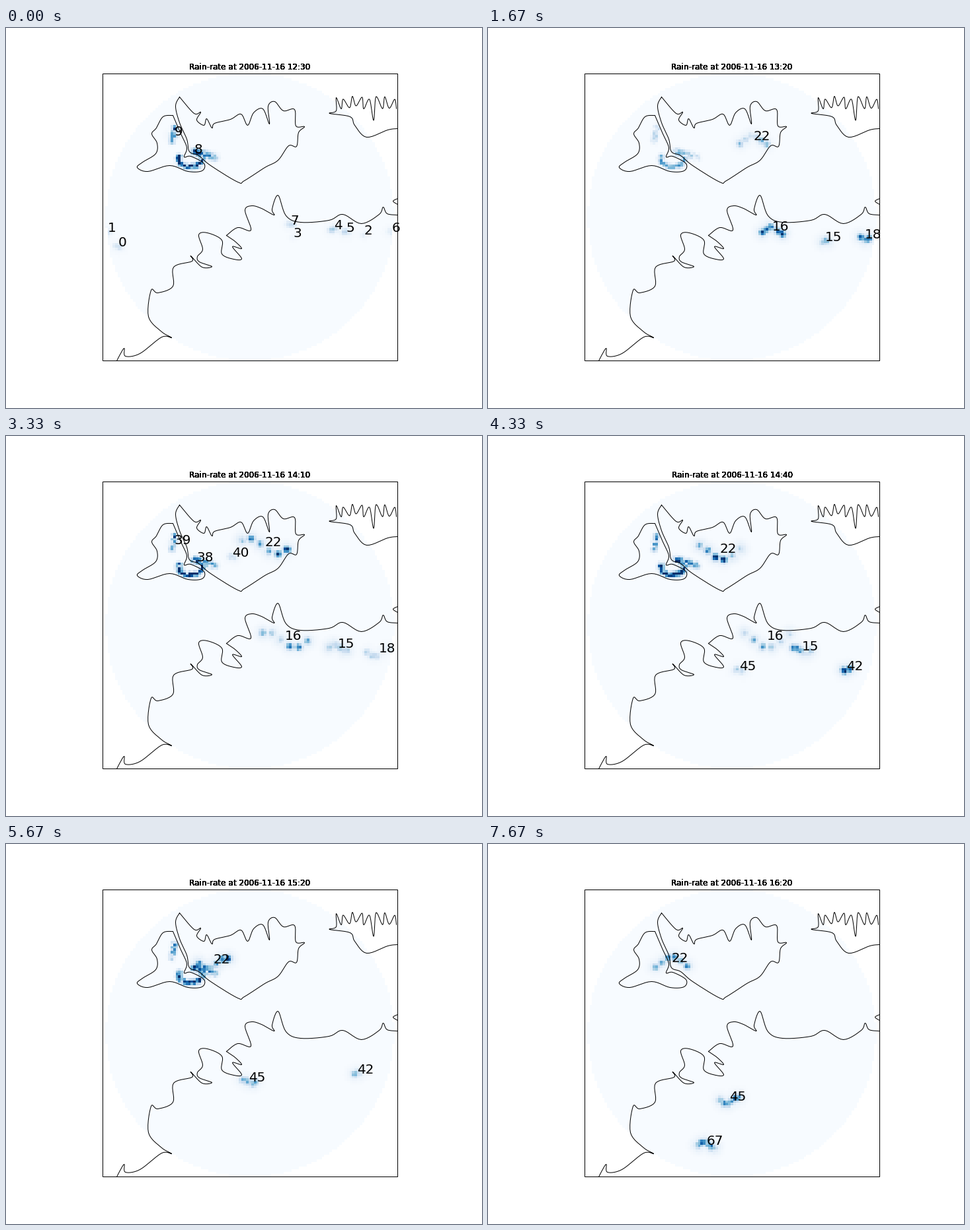
Animation, 720 px wide and 576 px high, one loop 8000 ms. Source, as a matplotlib script:

```python
import numpy as np
import matplotlib.pyplot as plt
from matplotlib.animation import FuncAnimation
from matplotlib.patches import Rectangle

W, H = 720, 576
LEFT, RIGHT, TOP, BOTTOM = 146, 592, 69, 504
CELLS = 117                       # radar cells along each side
STEPS, LOOP_MS, INTERVAL = 24, 8000, 50
FRAMES = LOOP_MS // INTERVAL

plt.rcParams["font.family"] = "DejaVu Sans"


# ---------------------------------------------------------------- coastlines
def smooth(points, n=8):
    """Catmull-Rom curve through the points, at pixel centres."""
    p = np.array(points, float) + 0.5
    p = np.vstack([p[0], p, p[-1]])
    a, b, c, d = (p[i:len(p) - 3 + i, None] for i in range(4))
    t = np.linspace(0, 1, n)[None, :, None]
    curve = 0.5 * (2 * b + (c - a) * t + (2 * a - 5 * b + 4 * c - d) * t**2
                   + (3 * b - a - 3 * c + d) * t**3)
    return curve.reshape(-1, 2).T


def fjords(x0, x1, teeth):
    """Zigzag inlets, cutting deepest around one bay."""
    k = np.arange(2 * teeth)
    x = np.linspace(x0, x1, len(k)) + 2 * np.sin(2.4 * k)
    inland = k % 2
    bay = 20 * np.exp(-((x - 558) / 9)**2)
    return list(zip(x, 105 + 2.5 * np.sin(k) + inland * (15 + bay)))


peninsula = [
    (252, 132), (237, 134), (227, 151), (220, 160), (228, 174), (226, 190),
    (206, 203), (198, 211), (214, 217), (247, 208), (275, 217), (296, 216),
    (299, 205), (279, 194), (269, 195), (273, 181), (264, 160), (252, 132)]
mainland = [
    (262, 104), (256, 118), (262, 143), (273, 168), (277, 187), (291, 193),
    (309, 208), (350, 233), (360, 231), (391, 211), (411, 200), (427, 178),
    (439, 179), (442, 158), (451, 149), (438, 148), (436, 123), (419, 125),
    (406, 111), (396, 118), (398, 145), (388, 122), (374, 128), (365, 147),
    (355, 130), (339, 138), (315, 144), (311, 151), (303, 137), (299, 147),
    (288, 139), (294, 127), (284, 129), (262, 104)]
north_east = [
    (592, 152), (577, 154), (545, 165), (527, 147), (520, 134), (489, 129),
    (499, 125)] + fjords(499, 592, 8)
east_coast = [
    (592, 283), (576, 281), (570, 271), (564, 282), (537, 296), (509, 282),
    (488, 291), (445, 294), (423, 284), (411, 253), (402, 274), (405, 283),
    (386, 273), (371, 269), (361, 276), (370, 306), (350, 302), (333, 314)]
west_coast = [
    (333, 314), (346, 323), (356, 334), (342, 331), (356, 349), (344, 350),
    (326, 342), (326, 321), (304, 310), (291, 313), (297, 335), (289, 346),
    (292, 354), (311, 361), (296, 362), (279, 345), (281, 353), (253, 362),
    (252, 391), (229, 401), (219, 397), (215, 437), (235, 460), (250, 469),
    (235, 468), (202, 493), (180, 497), (178, 485), (167, 504)]
headland = [(592, 258), (585, 262), (592, 267)]
COASTS = [peninsula, mainland, north_east, east_coast, west_coast, headland]


# -------------------------------------------------------------------- storms
# Lasting storms: number, first and last step, then keys of
# (step, label x, label y, spread, power).
storms = {}


def storm(number, first, last, *keys):
    storms[number] = (first, last, np.array(keys, float).T)


storm(15, 2, 16, (3, 527, 318, 4, .05), (7, 519, 314, 4, 1.3),
      (10, 515, 314, 13, .8), (15, 469, 321, 13, .6))
storm(16, 2, 13, (3, 443, 298, 14, .9), (7, 443, 302, 16, 1),
      (10, 435, 302, 34, .8))
storm(18, 2, 12, (3, 581, 314, 8, .4), (7, 584, 310, 4, 1.3),
      (10, 577, 321, 18, .3))
storm(22, 3, 23, (3, 412, 165, 8, .1), (7, 416, 161, 32, .9),
      (10, 404, 160, 34, 1), (15, 336, 176, 28, 1.1),
      (19, 317, 172, 16, 1.1), (23, 290, 172, 24, .7))
storm(42, 13, 20, (15, 555, 348, 4, 1), (19, 532, 333, 4, .05))
storm(45, 13, 23, (15, 393, 348, 6, .3), (19, 367, 359, 13, .8),
      (23, 378, 382, 14, .7))
storm(67, 18, 23, (19, 351, 461, 5, .45), (23, 343, 449, 12, .9))

# Brief, faint storms by the step in which they form.
brief = {
    0: {0: (176, 324), 1: (160, 302), 2: (548, 306), 3: (441, 310),
        4: (502, 298), 5: (521, 302), 6: (590, 302), 7: (437, 291),
        8: (291, 183), 9: (261, 156)},
    3: {17: (267, 157), 19: (496, 298), 20: (519, 291), 21: (297, 183),
        23: (435, 153)},
    7: {33: (562, 339), 34: (427, 183), 35: (534, 138), 36: (309, 153),
        37: (466, 153)},
    10: {38: (301, 183), 39: (267, 157), 40: (355, 176)},
    15: {46: (386, 307), 48: (554, 153), 53: (267, 157), 54: (516, 378),
         55: (497, 367), 56: (470, 363), 57: (381, 329), 58: (447, 296)},
    19: {68: (435, 404), 69: (550, 370), 73: (389, 393), 74: (547, 397),
         75: (370, 389), 76: (450, 172), 77: (531, 135)}}
for step, group in brief.items():
    for number, (x, y) in group.items():
        power = np.random.default_rng(number).uniform(.02, .3)
        storm(number, step, step + 1, (step, x, y, 3, power))


def state(number, step):
    """Centre, spread and power, or None when the storm is not there."""
    first, last, (when, x, y, spread, power) = storms[number]
    if not first <= step <= last:
        return None
    x, y, spread, power = (np.interp(step, when, v)
                           for v in (x, y, spread, power))
    # The label starts at the storm's centre and runs to the right.
    return x - 6.36 * len(str(number)), y + 7, spread, power


# ---------------------------------------------------------------------- rain
cell_x, cell_y = np.meshgrid(
    LEFT + (np.arange(CELLS) + .5) * (RIGHT - LEFT) / CELLS,
    TOP + (np.arange(CELLS) + .5) * (BOTTOM - TOP) / CELLS)
OUTSIDE = np.hypot(cell_x - 369, cell_y - 286.5) > 218


def blobs(xs, ys, powers, size=5):
    """Strongest of several soft round spots in every cell."""
    spots = np.broadcast(xs, ys, powers)
    return np.max([p * np.exp(-np.hypot(cell_x - x, cell_y - y)**2 / size**2)
                   for x, y, p in spots], axis=0)


def storm_rain(number, step):
    """A slowly bending chain of spots with a faint halo."""
    x, y, spread, power = state(number, step)
    s = np.linspace(-1, 1, 6)
    bend = .35 * spread * np.sin(2.5 * s + number + step / 3)
    strength = power * np.random.default_rng(number + step).uniform(.3, 1.2, 6)
    core = blobs(x + spread * s, y + bend, strength)
    halo = blobs(x + spread * s, y + bend, .15 * power, size=10)
    return np.maximum(core, halo)


def clutter(step):
    """Echoes around the peninsula: a crescent, a spur and a western streak."""
    power = np.interp(step, [4, 6, 8, 9, 17, 19], [1, 0, 0, 1, 1, 0])
    angle = np.linspace(0, 1.1 * np.pi, 16)
    u = np.linspace(0, 1, 8)
    crescent = blobs(279 + 18 * np.cos(angle), 199 + 11 * np.sin(angle), 1.4, 4)
    spur = blobs(286 + 30 * u, 188 + 8 * u, 1.3 - .7 * u, 5)
    streak = blobs(255 - 4 * u, 152 + 20 * u, 1 - .4 * u, 4)
    return power * np.max([crescent, spur, streak], axis=0)


def rain_field(step):
    noise = np.random.default_rng(step).random((CELLS, CELLS))**2
    layers = [clutter(step) * (1 - .85 * noise)]
    layers += [storm_rain(n, step) * (1.1 - .4 * noise)
               for n in storms if state(n, step)]
    return np.ma.array(np.clip(np.max(layers, axis=0), 0, 1), mask=OUTSIDE)


fields = [rain_field(step) for step in range(STEPS)]

# -------------------------------------------------------------------- figure
fig = plt.figure(figsize=(W / 72, H / 72), dpi=72, facecolor="white")
ax = fig.add_axes([0, 0, 1, 1])
ax.axis("off")

image = ax.imshow(fields[0], cmap="Blues", vmin=0, vmax=1, aspect="auto",
                  interpolation="nearest",
                  extent=(LEFT, RIGHT, BOTTOM, TOP))
for coast in COASTS:
    ax.plot(*smooth(coast), color="black", lw=1, zorder=3)
ax.add_patch(Rectangle((LEFT, TOP), RIGHT - LEFT, BOTTOM - TOP,
                       fill=False, lw=1, zorder=4))
ax.set_xlim(0, W)
ax.set_ylim(H, 0)

# Stacked copies give the title its heavy edges.
titles = [ax.text(369, 62.6, "", fontsize=12, ha="center", va="baseline")
          for _ in range(10)]
labels = {n: ax.text(0, 0, str(n), fontsize=20, zorder=5) for n in storms}


def update(frame):
    # The step changes in the frame that holds its exact moment.
    step = ((frame + 1) * INTERVAL - 1) * STEPS // LOOP_MS
    hour, minute = divmod(12 * 60 + 30 + 10 * step, 60)
    for title in titles:
        title.set_text(f"Rain-rate at 2006-11-16 {hour:02d}:{minute:02d}")
    image.set_data(fields[step])
    for number, label in labels.items():
        now = state(number, step)
        label.set_visible(now is not None)
        if now:
            label.set_position(now[:2])
    return [image, *titles, *labels.values()]


anim = FuncAnimation(fig, update, frames=FRAMES, interval=INTERVAL,
                     repeat=True, repeat_delay=0, blit=False)
plt.show()
```
